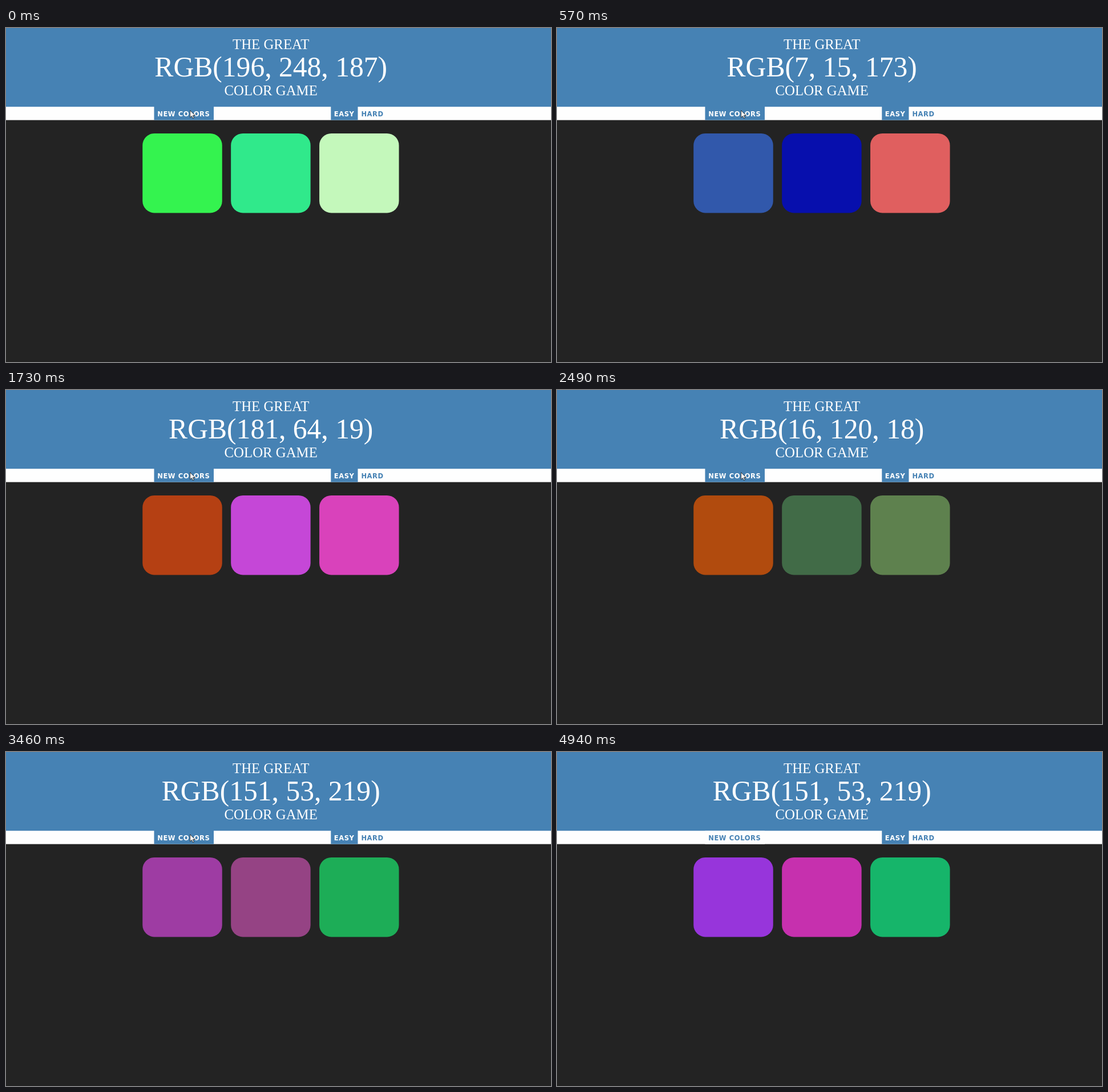
These frames come from a looping animation (955 by 586 pixels, 5460 ms). An HTML page:

```html
<!DOCTYPE html>
<html lang="en">
<head>
<meta charset="utf-8">
<title>Color game</title>
<style>
  html, body { margin: 0; height: 100%; overflow: hidden; background: #232323; }
  svg { display: block; width: 100vw; height: 100vh; }
  .title { font: 24.8px "Liberation Serif", serif; fill: #fff; text-anchor: middle; }
  #code { font-size: 49.6px; }
  .label { font: bold 11.5px "DejaVu Sans", sans-serif; letter-spacing: .6px; fill: #4682b4; }
  .label.on { fill: #fff; }
</style>
</head>
<body>
<svg viewBox="0 0 955 586">
  <rect width="955" height="586" fill="#232323"/>
  <rect width="955" height="161.6" fill="#fefefe"/>
  <rect width="955" height="138.2" fill="#4682b4"/>
  <text class="title" x="464.2" y="36.8">THE GREAT</text>
  <text class="title" x="464.2" y="85.4" id="code"></text>
  <text class="title" x="464.2" y="117.8">COLOR GAME</text>

  <rect id="button" x="259.5" y="138" width="104.5" height="23.6"/>
  <text id="buttonLabel" class="label" x="265.2" y="154.6">NEW COLORS</text>
  <rect x="569.3" y="138" width="47.2" height="23.6" fill="#4682b4"/>
  <text class="label on" x="574.7" y="154.6">EASY</text>
  <text class="label" x="622.4" y="154.6">HARD</text>

  <g id="squares"></g>
  <path id="cursor" d="M.4 .5V12.6L3.2 10 5.1 14.3 7.1 13.4 5.2 9.2H9Z"
        fill="#fff" stroke="#000" stroke-width=".75"/>
</svg>
<script>
const LOOP = 5460, LEAVE = 4250;
const BLUE = "#4682b4", WHITE = "#fefefe";
const $ = id => document.getElementById(id);

// The color written as rgb() is the one to guess.
const rounds = [
  { start: -1000, colors: ["#34f34f", "#30e98b", "rgb(196, 248, 187)"] },
  { start: 150, colors: ["#3158ab", "rgb(7, 15, 173)", "#e05f5f"] },
  { start: 1310, colors: ["rgb(181, 64, 19)", "#c547d7", "#d942bb"] },
  { start: 2370, colors: ["#b04f0c", "rgb(16, 120, 18)", "#309825"] },
  { start: 3310, colors: ["rgb(151, 53, 219)", "#c630ae", "#16b56a"] }
];

// Cursor rest position, then one position per step until it leaves the stage.
const cursorStops = [[322.3, 144.3], [500, 228], [699, 325], [798, 452], [903, 537], [907, 574]];

const squares = [0, 1, 2].map(i => {
  const rect = document.createElementNS("http://www.w3.org/2000/svg", "rect");
  const attrs = { x: 239.25 + 154.9 * i, y: 184.9, width: 139.5, height: 139.5, rx: 21 };
  for (const name in attrs) rect.setAttribute(name, attrs[name]);
  return $("squares").appendChild(rect);
});

// Motion is seen in coarse steps, about seven per second.
const steps = elapsed => Math.floor((elapsed + 20) / 138);

// Share of a 300 ms ease-out transition done after n steps.
const fade = n => 1 - (1 - Math.min(1, Math.max(0, n * 130 / 300))) ** 2.3;

const mix = (a, b, k) => `color-mix(in srgb, ${a}, ${b} ${k * 100}%)`;

function draw(t) {
  const index = rounds.findLastIndex(r => r.start <= t);
  const { start, colors } = rounds[index];
  const before = rounds[Math.max(0, index - 1)].colors;
  const k = fade(steps(t - start));
  $("code").textContent = colors.find(c => c.startsWith("rgb")).toUpperCase();
  squares.forEach((s, i) => s.style.fill = mix(before[i], colors[i], k));

  const moved = t < LEAVE ? -1 : steps(t - LEAVE);
  $("button").style.fill = mix(BLUE, WHITE, fade(moved));
  $("buttonLabel").style.fill = mix(WHITE, BLUE, fade(moved));

  const stop = cursorStops[moved + 1];
  $("cursor").style.display = stop ? "" : "none";
  if (stop) $("cursor").setAttribute("transform", `translate(${stop})`);
}

const begin = performance.now();
function tick() {
  draw((performance.now() - begin) % LOOP);
  requestAnimationFrame(tick);
}
tick();
</script>
</body>
</html>
```
